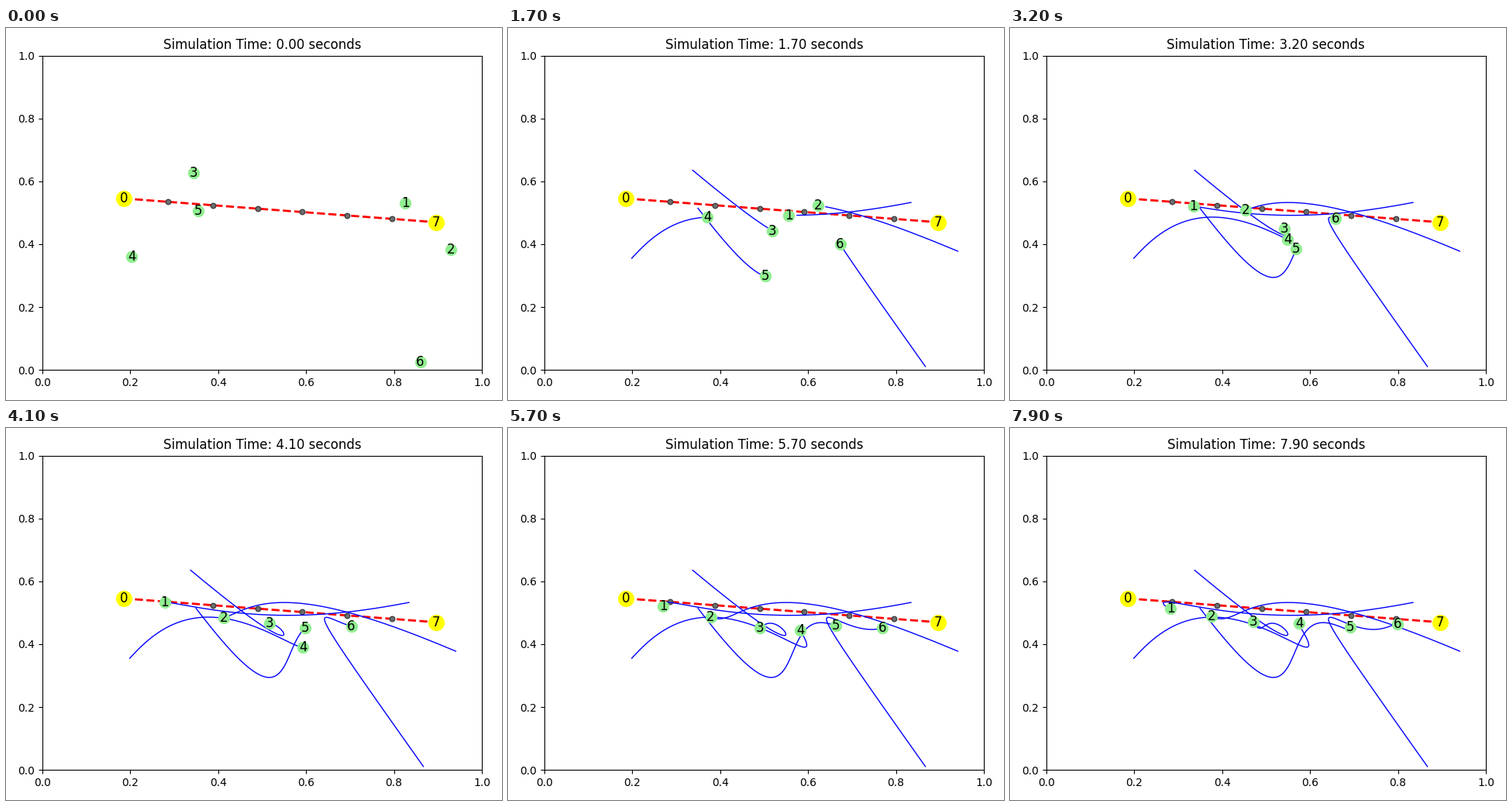
These frames come from a looping animation (640 by 480 pixels, 8 s). A matplotlib script:

```python
import numpy as np
import matplotlib.pyplot as plt
from matplotlib.animation import FuncAnimation

DT = 0.1
FRAMES = 80
LEAD = 3            # steps already taken when the clock reads zero
STIFFNESS, DAMPING = 0.5, 1.0

# Agents 0 and 7 are fixed anchors; the others start at rest.
START = np.array([
    [0.1852, 0.5455], [0.8342, 0.5327], [0.9406, 0.3778], [0.3376, 0.6353],
    [0.1991, 0.3551], [0.3497, 0.5144], [0.8670, 0.0111], [0.8965, 0.4698],
])


def simulate(steps):
    """Each agent is drawn to its two neighbours, with damping (Euler steps)."""
    pos, vel = START.copy(), np.zeros_like(START)
    path = [pos.copy()]
    for _ in range(steps):
        acc = np.zeros_like(pos)
        pull = pos[:-2] + pos[2:] - 2 * pos[1:-1]
        acc[1:-1] = STIFFNESS * pull - DAMPING * vel[1:-1]
        pos = pos + DT * vel
        vel = vel + DT * acc
        path.append(pos.copy())
    return np.array(path)


path = simulate(FRAMES + LEAD)
ends = START[[0, -1]]
goals = np.linspace(ends[0], ends[1], len(START))[1:-1]

plt.rcParams["font.family"] = "DejaVu Sans"
fig, ax = plt.subplots(figsize=(6.4, 4.8), dpi=100)
ax.set(xlim=(0, 1), ylim=(0, 1))
title = ax.set_title("Simulation Time: 0.00 seconds", fontsize=12)
fig.tight_layout()
fig.subplots_adjust(top=1 - 35.5 / 480)

ax.plot(*ends.T, "--", color="red", lw=2, zorder=1)
ax.scatter(*goals.T, s=22, facecolor="0.43", edgecolor="0.25", lw=1, zorder=1.5)
trails = [ax.plot([], [], color="blue", lw=1, zorder=2)[0] for _ in START[1:-1]]
ax.scatter(*ends.T, s=200, color="yellow", lw=1, zorder=3)
agents = ax.scatter(*START[1:-1].T, s=100, color="lightgreen", lw=1, zorder=3)
labels = [ax.text(x, y, str(i), fontsize=12, ha="center", va="center", zorder=4)
          for i, (x, y) in enumerate(START)]


def update(frame):
    now = frame + LEAD
    title.set_text(f"Simulation Time: {frame * DT:.2f} seconds")
    agents.set_offsets(path[now, 1:-1])
    for i, trail in enumerate(trails, start=1):
        trail.set_data(*path[:now, i].T)
    for label, xy in zip(labels, path[now]):
        label.set_position(xy)
    return [title, agents, *trails, *labels]


anim = FuncAnimation(fig, update, frames=FRAMES, interval=100,
                     repeat=True, repeat_delay=0, blit=False)
plt.show()
```
